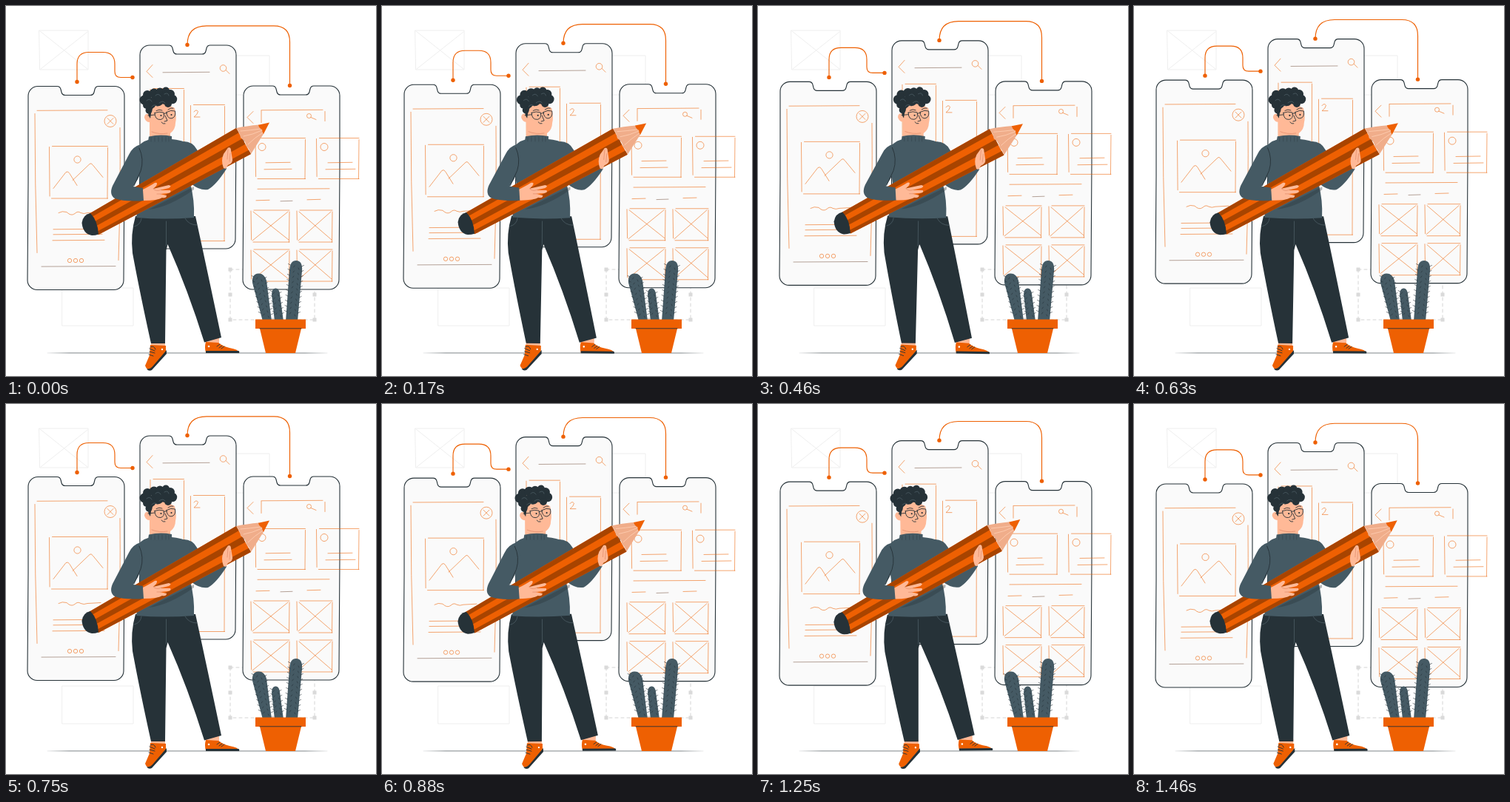
These frames come from a looping animation (500 by 500 pixels, 1500 ms). An HTML page:

```html
<!DOCTYPE html>
<html lang="en">
<head>
<meta charset="utf-8">
<title>Sketching app screens</title>
<style>
  html, body { margin: 0; width: 100%; height: 100%; overflow: hidden; background: #fff; }
  svg { display: block; width: 100vw; height: 100vh; }
  path, line { stroke-linecap: round; stroke-linejoin: round; }
  .ghost { fill: none; stroke: #ececec; stroke-width: .9; }
  .body { fill: #fafafa; stroke: #263238; stroke-width: 1.1; }
  .sk { fill: none; stroke: #ee6002; stroke-width: .75; opacity: .75; }
  .dim { fill: none; stroke: #74503c; stroke-width: .7; opacity: .75; }
  .wire { fill: none; stroke: #ee6002; stroke-width: 1.15; }
  .or { fill: #ee6002; }
  .dk { fill: #263238; }
  .knit { fill: #455a64; }
  .skin { fill: #ffb997; }
  .ink { fill: none; stroke: #263238; stroke-width: .9; }
  .fold { fill: none; stroke: #de8a69; stroke-width: .7; }
  .seam { fill: none; stroke: #52636b; stroke-width: .7; }
  .brown { fill: #a84400; }
</style>
</head>
<body>
<svg viewBox="0 0 500 500" xmlns="http://www.w3.org/2000/svg">
  <defs>
    <path id="phone" d="M0 13A13 13 0 0 1 13 0H39Q43 0 44 4L45 8Q46 12 50 12H84Q88 12 89 8L90 4Q91 0 95 0H117A13 13 0 0 1 130 13V110L129 262A13 13 0 0 1 116 275H12A13 13 0 0 1 -1 262L0 130Z"/>
    <linearGradient id="fade" gradientUnits="userSpaceOnUse" x1="56" x2="434" y1="0" y2="0">
      <stop offset="0" stop-color="#263238" stop-opacity=".1"/>
      <stop offset=".08" stop-color="#263238" stop-opacity=".6"/>
      <stop offset=".92" stop-color="#263238" stop-opacity=".6"/>
      <stop offset="1" stop-color="#263238" stop-opacity=".1"/>
    </linearGradient>
  </defs>

  <g class="ghost">
    <path d="M45 33H111V86H46ZM46 34L110 85M110 35L47 85"/>
    <path d="M290 67H356V120H290Z"/>
    <path d="M76 381H172V432H76Z"/>
  </g>
  <g id="select"></g>

  <g id="float">
    <use href="#phone" class="body" x="181" y="52.5"/>
    <use href="#phone" class="body" x="30" y="108"/>
    <use href="#phone" class="body" x="321" y="107.5"/>
    <g id="sketch"></g>
    <g class="sk">
      <path d="M39 145Q39 240 42 333M154 164Q155 250 152 343"/>
      <circle cx="141" cy="155" r="8"/>
      <path d="M137 151L145 159M145 151L137 159"/>
      <circle cx="96.5" cy="207" r="4.6"/>
      <path d="M64 246L81 224Q84 222 86 226L96 242M90 235L113 213Q115 211 117 214L131 231"/>
      <path d="M71 279Q76 276 82 278Q88 284 93 280Q97 276 101 279Q105 281 110 279L128 278"/>
      <circle cx="86" cy="343.5" r="2.7"/><circle cx="94" cy="343.5" r="2.7"/><circle cx="102" cy="343.5" r="2.7"/>
      <path d="M198 79L190 88L198 96"/>
      <circle cx="293.5" cy="83.5" r="4.3"/><path d="M297 86L302 91"/>
      <path d="M254 142.500Q257 138.500 259.500 142Q259 146 254 149.500H262"/>
      <path d="M334 142L326 150L334 158"/>
      <path d="M345 157V141M431 142V155"/>
      <circle cx="409.5" cy="148" r="3"/><path d="M412 150L419 153"/>
      <circle cx="346" cy="190" r="5"/><circle cx="430" cy="190" r="5"/>
    </g>
    <path class="wire" d="M96 102V78Q96 62 112 62H131Q147 62 147 78V88Q147 96 155 96H171"/>
    <path class="wire" d="M245 52Q245 26.300 271 26.300H362Q383.500 26.300 383.500 48V107"/>
    <g class="or">
      <circle cx="96" cy="102" r="2.7"/><circle cx="171" cy="96" r="2.7"/>
      <circle cx="245" cy="52" r="2.7"/><circle cx="383.5" cy="107" r="2.7"/>
    </g>
  </g>

  <line x1="56" y1="468.9" x2="434" y2="469" stroke="url(#fade)"/>

  <g id="cactus">
    <g class="knit">
      <path d="M347 426L333 374Q332 362 341 361.500Q349 361 352 371L359 426Z"/>
      <path d="M363 426L359 390Q359 382 364 381.500Q369 381 370 389L375 426Z"/>
      <path d="M378 426L383 357Q384 344 392 344Q401 344 400 358L394 426Z"/>
    </g>
    <g id="spines" class="ink"></g>
    <path class="or" d="M337 423.500H405V436H337ZM343 436H399L391 469H351Z"/>
    <path class="ink" d="M343 435.800H399"/>
  </g>

  <g id="man">
    <!-- shoes -->
    <path class="skin" d="M270 448L288 445V457L270 458ZM196 453H215V461H196Z"/>
    <path class="or" d="M195 458L216 459L216 468L196 492Q190 492 188 486L194 472Z"/>
    <path class="dk" d="M217 465L217 470L197 492Q193 494 190 490.500Q195 491 199 486Z"/>
    <path class="ink" d="M195 461Q200 458 202 464M194 463L201 466M194 467L201 469M193 471L199 473"/>
    <path class="or" d="M270 454L287 455Q293 460 302 462Q314 464 315 468H270Q268 461 270 454Z"/>
    <path class="dk" d="M270 466H314.500Q316 467 315 469H270Z"/>
    <path class="ink" d="M285 460L289 457M288 462L292 459M291 463L295 460"/>
    <circle cx="274" cy="460" r="1.3" fill="#fff"/><circle cx="211" cy="464" r="1.2" fill="#fff"/>
    <!-- trousers -->
    <path class="dk" d="M175 284Q168 308 171 334Q181 388 196 456H215L216.500 330L218.500 322Q246 384 268 454.500L291 448Q273 362 256 284Z"/>
    <path class="seam" d="M216.500 291V324M183 287Q182 296 173 298M242 287Q247 296 258 296"/>
    <!-- torso and far arm -->
    <path class="knit" d="M240 183Q252 183 258 194L273 217L296 212L298 220Q284 242 273 248Q262 250 250 240Z"/>
    <path class="knit" d="M192 181Q180 184 176 196L181 240Q179 268 176 286Q214 289 254 286Q255 262 249 240L248 186Q236 181 224 180Z"/>
    <!-- head -->
    <path class="skin" d="M193 146Q187 145 187 151Q189 157 194 157L194 178H222V172Q229 167 229 158Q231 151 228 138L212 130L194 138Z"/>
    <path class="knit" d="M193 176.500Q208 173 224 176L224 184Q208 186 192 183Z"/>
    <path d="M196 178V183M201 177.500V183M206 177V183M211 177V183M216 177V183M220 177V183" stroke="#263238" stroke-width=".5" opacity=".7"/>
    <g id="hair" class="dk"></g>
    <path class="dk" d="M192 137L199 137Q196 142 195 152Q193 150 192 145Z"/>
    <path class="seam" d="M190 128Q194 124 197 129M202 121Q206 117 209 122M214 119Q219 116 220 121M207 131Q212 127 215 131M197 136Q200 132 204 135"/>
    <path class="ink" d="M201 144.500Q207 142 213 144Q215 152 209 153.500Q201 154 201 144.500ZM217 143.500Q223 140 228.500 142Q230 151 223 152Q217 151 217 143.500ZM213 146Q215 144 217 145M201 147L192 148"/>
    <path class="ink" d="M203 141.500Q207 139 211 141M219 140Q223 137 226 138M215 148L218 155L214 156M210 157Q212 160 215 159"/>
    <circle class="dk" cx="209.500" cy="148" r="1.1"/><circle class="dk" cx="223.500" cy="147" r="1.1"/>
    <path class="fold" d="M197 170Q207 174 218 172"/>
    <!-- pencil -->
    <path d="M193 275L254 244V248Q220 272 193 275Z" fill="#263238" opacity=".35"/>
    <g id="pencil"></g>
    <path fill="#f0ad8a" d="M311 165Q325 162 342 160.500L348.500 172L331 200Q329 193 325 190Q324 182 317 178Q316 171 311 165Z"/>
    <path d="M317 169Q330 168 344 166M321 176Q333 174 346 168M327 187Q336 178 347 171" fill="none" stroke="#ffd0b5" stroke-width=".8"/>
    <path class="or" d="M341 160.700L356 157.500L348 173Q346 170 346 167Q342 165 341 160.700Z"/>
    <path class="dk" d="M114 280Q104 282 102.500 293Q104 308 116 310Q121 310 125 308.500Q124 290 114 280Z"/>
    <!-- near arm and hands -->
    <path class="knit" d="M182 187Q171 190 166 201L144 243Q139 255 147 260Q160 265 187 263L185 246L172 244Q186 224 187 202Z"/>
    <path class="ink" d="M180 192Q187 207 182 223L173 243"/>
    <path class="skin" d="M185 248Q195 243 201 239Q206 238 203 243L199 247L220 242Q225 243 220 246L208 249L222 249Q224 252 219 253L208 254L217 256Q217 260 211 259Q205 263 186 263Z"/>
    <path class="fold" d="M199 247Q203 251 208 249M204 254H209"/>
    <path class="skin" d="M294 219Q290 209 294 200L300 191.500Q304 190 304 195L306 207Q307 212 300 215L297 220Z"/>
    <path class="fold" d="M300 194L299 207M303 199L302 210"/>
  </g>
</svg>

<script>
const $ = id => document.getElementById(id);

function add(parent, tag, attrs) {
  const el = document.createElementNS('http://www.w3.org/2000/svg', tag);
  for (const k in attrs) el.setAttribute(k, attrs[k]);
  return parent.appendChild(el);
}

const sketch = $('sketch');
const rule = (x1, x2, y, cls = 'sk') => add(sketch, 'path', { class: cls, d: `M${x1} ${y + .3}L${x2} ${y - .2}` });

// Hand-drawn frame: sides stop short of the corners.
function frame(x1, y1, x2, y2, cross) {
  let d = `M${x1 + 4} ${y1}H${x2}M${x1} ${y1 + 1}L${x1 + .6} ${y2 - 3}` +
    `M${x2} ${y1 + 2}L${x2 - .5} ${y2}M${x1 + 3} ${y2}H${x2}`;
  if (cross) d += `M${x1 + 3} ${y1 + 2}L${x2 - 1} ${y2 - 3}M${x2 - 2} ${y1 + 2}L${x1 + 2} ${y2 - 2}`;
  add(sketch, 'path', { class: 'sk', d });
}

rule(42, 137, 140.5);
frame(58.5, 189, 137.5, 259.5);
rule(64, 132, 301);
rule(64, 130, 308);
rule(63, 133, 316);
rule(48, 148, 351.3, 'dim');

rule(212, 275, 89, 'dim');
frame(195, 111, 240.5, 317);
frame(249.5, 133, 295.5, 317);

rule(345, 428, 140);
frame(337, 178, 404.5, 233);
frame(419.5, 178, 477, 233);
rule(351, 384, 211);
rule(349, 386, 220);
rule(435, 468, 211);
rule(432, 472, 220);
rule(340, 437, 246.5);
rule(338, 356, 262);
rule(371, 387, 263, 'dim');
rule(407, 425, 261);
for (const y of [275.5, 328.5]) {
  frame(331, y, 383, y + 43, true);
  frame(393, y, 441, y + 43, true);
}

add($('select'), 'path', {
  d: 'M303 356H417V424H303Z', fill: 'none', stroke: '#d0d0d0', 'stroke-width': .9, 'stroke-dasharray': '4 4'
});
for (const x of [303, 360, 417])
  for (const y of [356, 390, 424])
    if (x !== 360 || y !== 390)
      add($('select'), 'rect', { x: x - 2.5, y: y - 2.5, width: 5, height: 5, fill: '#dadada' });

// Spines run up each stem: foot x, head x, head y, half width.
for (const [foot, head, top, half] of [[353, 342, 366, 8], [369, 364.5, 386, 5.5], [386, 392, 350, 8.5]]) {
  for (let y = top; y < 420; y += 7) {
    const x = head + (foot - head) * (y - top) / (424 - top);
    add($('spines'), 'path', {
      d: `M${x - half + 1} ${y}l-3 -1.500M${x + half - 1} ${y + 2}l3 -1.500M${x - 2} ${y + 1}l-1.500 2M${x + 3} ${y + 4}l1 2`,
      style: 'stroke-width: .6'
    });
  }
}

for (const [x, y, r] of [
  [187, 127, 6.5], [191, 120, 6], [200, 118, 6.5], [208, 116, 5.5], [216, 114.5, 5], [222, 119, 6],
  [225, 126, 6.2], [215, 125, 8], [205, 127, 8.5], [195, 131, 8], [190, 134, 5], [193, 141, 4.5], [219, 132, 5]
]) add($('hair'), 'circle', { cx: x, cy: y, r });

// Pencil bands are cut between its two slightly diverging edges.
function band(a, b, cls) {
  const p = k => `${112 + 13 * k} ${281 + 28 * k}`;
  const q = k => `${311 + 20 * k} ${165 + 35 * k}`;
  add($('pencil'), 'path', { class: cls, d: `M${p(a)}L${q(a)}L${q(b)}L${p(b)}Z` });
}
band(0, 1, 'or');
band(0, .18, 'brown');
band(.41, .62, 'brown');
band(.85, 1, 'brown');

const LOOP = 1500, FRAMES = 36;
const float = $('float'), man = $('man');

// Triangle wave, period 1: 0, 1 at a quarter, -1 at three quarters.
const tri = p => p < .25 ? 4 * p : p < .75 ? 2 - 4 * p : 4 * p - 4;

function draw(ms) {
  const p = Math.floor((ms + 4) % LOOP * FRAMES / LOOP) / FRAMES;
  const lift = 10 * (1 - Math.abs(1 - 2 * p));
  float.setAttribute('transform', `translate(0 ${.5 - lift})`);
  man.setAttribute('transform', `rotate(${tri(p)} 229 301)`);
}

const start = performance.now();
function tick() {
  draw(performance.now() - start);
  requestAnimationFrame(tick);
}
draw(0);
requestAnimationFrame(tick);
</script>
</body>
</html>
```
